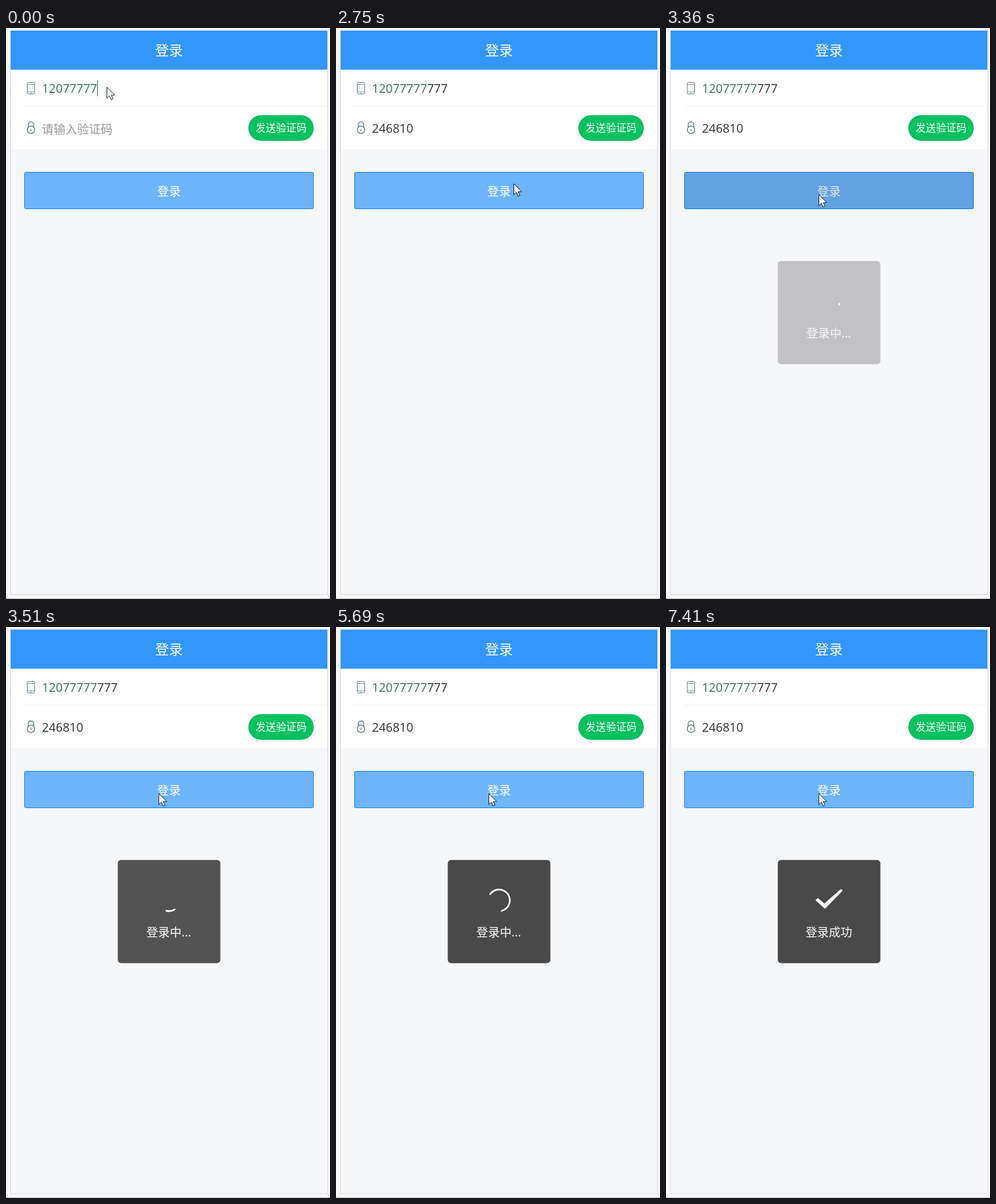
Write an HTML page that moves like this. It is 480 px wide and 845 px high and loops after 8 s.

```html
<!DOCTYPE html>
<html lang="zh-CN">
<head>
<meta charset="utf-8">
<title>登录</title>
<style>
  html, body { margin: 0; width: 100%; height: 100%; overflow: hidden; background: #f8f8f8; }
  svg { display: block; }
  text { font: 17.5px "Noto Sans CJK SC", "Noto Sans CJK", sans-serif; }
  .mid { text-anchor: middle; fill: #fff; }
  .digits { font: 17.85px "Open Sans", "Noto Sans", sans-serif; fill: #323233; }
  .icon { fill: none; stroke: #4f777c; stroke-width: 1.2; }
</style>
</head>
<body>
<svg width="480" height="845" viewBox="0 0 480 845">
  <rect width="480" height="845" fill="#f8f8f8"/>
  <rect x="6.5" y="3.5" width="470" height="835" fill="#f6f7f9" stroke="#d9dadb"/>
  <rect y="844" width="480" height="1" fill="#bdbdbd"/>

  <rect x="7" y="4" width="469" height="58" fill="#3296fa"/>
  <rect x="7" y="61" width="469" height="1" fill="#6fb3f6"/>
  <text class="mid" x="241.5" y="41" style="font-size:20.5px">登录</text>

  <rect x="7" y="62" width="469" height="117" fill="#fff"/>
  <rect x="27" y="115" width="449" height="1" fill="#f3f4f5"/>
  <g class="icon">
    <rect x="31.5" y="80.5" width="11" height="17" rx="1.5" stroke="#7d8a8c" stroke-width="1"/>
    <path d="M32 83.5h10M32 94.5h10" stroke="#7fa9c4" stroke-width="1"/>
    <path d="M36 96h2" stroke="#7d8a8c" stroke-width="1"/>
    <circle cx="37" cy="150.6" r="5.5"/>
    <path d="M33 147v-4.2a4 4 0 0 1 8 0v4.2"/>
    <path d="M37 149.5v3" stroke="#a8894e" stroke-width="1.6"/>
  </g>
  <text class="digits" x="53.3" y="96"><tspan fill="#3c705a">12077777</tspan><tspan id="phoneEnd"></tspan></text>
  <text class="digits" x="53.3" y="155" id="code"></text>
  <text x="53" y="155.5" fill="#969799" id="hint">请输入验证码</text>
  <rect id="caret" width="1" height="24" fill="#2f7d5c"/>

  <rect x="359" y="129" width="97" height="38" rx="19" fill="#07c160"/>
  <text class="mid" x="407.5" y="153.3" style="font-size:15.1px">发送验证码</text>

  <rect x="27.5" y="213.5" width="428" height="54" rx="2" fill="#6db4fb" stroke="#1989fa"/>
  <text class="mid" x="241.5" y="247.5">登录</text>
  <rect id="press" x="27" y="213" width="429" height="55" rx="2" opacity=".1"/>

  <g id="toast">
    <rect x="165.6" y="344.8" width="152" height="152.6" rx="5" opacity=".7"/>
    <circle id="spinner" r="16" fill="none" stroke="#fff" stroke-width="2.4" stroke-linecap="round"/>
    <path id="check" d="M221.3 404.3l3.7-3.4 9.5 8.3 23.800-20.600q2.800-1.200 3.200 1.800L235.500 417z" fill="#fff"/>
    <text class="mid" x="241.2" y="457.5" id="message" style="font-size:17.3px"></text>
  </g>

  <path id="pointer" d="M.5.5v16.3l3.7-3.5 2.6 5.7 2.7-1.2-2.500-5.500h5z" fill="#fff" stroke="#222b35"/>
</svg>
<script>
const LOOP = 8000, CHAR = 10.2, TOAST_START = 3300, SPIN_RATE = 1.012, DONE = 7410;
const phoneKeys = [150, 300, 470], codeKeys = [1170, 1340, 1480, 1710, 1860, 2090];
const pointerPath = [[2560, 149, 87], [2750, 263, 230], [2960, 226, 246]];
const $ = id => document.getElementById(id);
const show = (id, on) => $(id).setAttribute('visibility', on ? 'visible' : 'hidden');
const set = (id, attrs) => { for (const k in attrs) $(id).setAttribute(k, attrs[k]); };
const clamp = v => Math.min(1, Math.max(0, v));
const typed = (keys, t) => keys.filter(k => t >= k).length;

function bezier(x1, y1, x2, y2) {
  const at = (a, b, s) => 3 * a * s * (1 - s) ** 2 + 3 * b * s * s * (1 - s) + s ** 3;
  return x => {
    let lo = 0, hi = 1;
    for (let i = 0; i < 20; i++) {
      const s = (lo + hi) / 2;
      if (at(x1, x2, s) < x) lo = s; else hi = s;
    }
    return at(y1, y2, lo);
  };
}
const ease = bezier(.25, .1, .25, 1), easeInOut = bezier(.42, 0, .58, 1);

function pointerAt(t) {
  let [, x, y] = pointerPath[0];
  for (let i = 1; i < pointerPath.length; i++) {
    const [t0, x0, y0] = pointerPath[i - 1], [t1, x1, y1] = pointerPath[i];
    if (t < t0) break;
    const p = clamp((t - t0) / (t1 - t0)), e = p * p * (3 - 2 * p);
    x = x0 + (x1 - x0) * e;
    y = y0 + (y1 - y0) * e;
  }
  return `translate(${x} ${y})`;
}

// Circular loader: a dash that grows then slides, in units of radius 20
function drawSpinner(age) {
  const p = age % 1500 / 750, grow = easeInOut(Math.min(p, 1)), slide = p > 1 ? easeInOut(p - 1) : 0;
  set('spinner', {
    transform: `translate(241.5 404.5) rotate(${age * .18})`,
    'stroke-dasharray': `${(1 + 89 * grow) * .8} ${(200 - 50 * grow) * .8}`,
    'stroke-dashoffset': -(40 * grow + 80 * slide) * .8
  });
}

function draw(t) {
  const inPhone = t < 700, phoneCount = typed(phoneKeys, t), codeCount = typed(codeKeys, t);
  const done = t >= DONE, age = Math.max(0, t - TOAST_START);
  $('phoneEnd').textContent = '777'.slice(0, phoneCount);
  $('code').textContent = '246810'.slice(0, codeCount);
  show('hint', !codeCount);
  set('caret', { x: Math.round(53 + CHAR * (inPhone ? 8 + phoneCount : codeCount)), y: inPhone ? 77 : 136 });
  show('caret', t < 2560);
  set('pointer', { transform: pointerAt(t) });
  show('press', t >= 3200 && t < 3450);
  set('toast', { opacity: ease(clamp(age / 300)) });
  show('toast', age > 0);
  $('spinner').style.display = done ? 'none' : '';
  $('check').style.display = done ? '' : 'none';
  $('message').textContent = done ? '登录成功' : '登录中...';
  drawSpinner(age * SPIN_RATE);
}

const start = performance.now();
function tick() {
  draw((performance.now() - start) % LOOP);
  requestAnimationFrame(tick);
}
tick();
</script>
</body>
</html>
```
